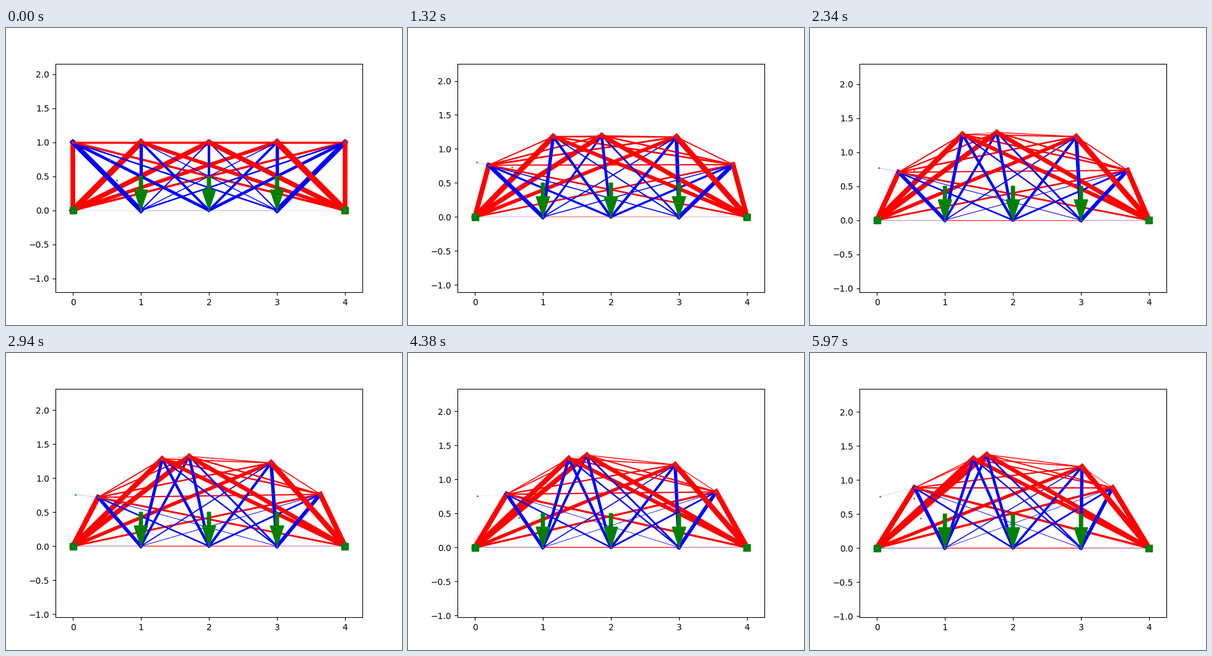
Animation of 640x480 px, one loop 6 s. Source, as a matplotlib script:

```python
from itertools import combinations

import matplotlib.pyplot as plt
import numpy as np
from matplotlib.animation import FuncAnimation
from matplotlib.patches import Rectangle

FRAMES, INTERVAL = 200, 30
LOAD = 10
SPAN = 4
HALF_H = 4.51 * 369.6 / 496 / 2

# Each upper joint starts at (x, 1) and glides through three waypoints
KEYS = np.array([0, 59, 98, FRAMES - 1])
WAYPOINTS = [
    [(.263, .714), (.372, .718), (.554, .884)],
    [(1.20, 1.227), (1.313, 1.282), (1.418, 1.315)],
    [(1.818, 1.248), (1.709, 1.32), (1.614, 1.373)],
    [(2.95, 1.214), (2.914, 1.225), (3.014, 1.193)],
    [(3.737, .727), (3.637, .762), (3.464, .884)],
]
PATHS = np.array([[(x, 1), *pts] for x, pts in enumerate(WAYPOINTS)])
SLOPES = np.gradient(PATHS, KEYS, axis=1)
LOOSE = [(.545, .73), (.645, .44)]

# Joints go column by column, bottom before top
JOINTS = 2 * (SPAN + 1)
BARS = list(combinations(range(JOINTS), 2))
FREE = [d for d in range(2 * JOINTS) if d // 2 not in (0, 2 * SPAN)]


def joints_at(t):
    """Bottom joints stay put, top joints follow a cubic Hermite curve."""
    i = min(np.searchsorted(KEYS, t, side="right"), len(KEYS) - 1) - 1
    h = KEYS[i + 1] - KEYS[i]
    s = (t - KEYS[i]) / h
    joints = np.zeros((JOINTS, 2))
    joints[::2, 0] = range(SPAN + 1)
    joints[1::2] = ((1 + 2 * s) * (1 - s) ** 2 * PATHS[:, i]
                    + s * (1 - s) ** 2 * h * SLOPES[:, i]
                    + s * s * (3 - 2 * s) * PATHS[:, i + 1]
                    + s * s * (s - 1) * h * SLOPES[:, i + 1])
    return joints


def bar_forces(joints):
    """Axial forces in a truss of equal springs under three loads."""
    rows = np.zeros((len(BARS), 2 * JOINTS))
    for row, (a, b) in zip(rows, BARS):
        d = joints[b] - joints[a]
        d = d / np.hypot(*d)
        row[2 * a:2 * a + 2] = -d
        row[2 * b:2 * b + 2] = d
    load = np.zeros(2 * JOINTS)
    load[5:4 * SPAN:4] = -LOAD
    rows = rows[:, FREE]
    return rows @ np.linalg.solve(rows.T @ rows, load[FREE])


def style(line, p, q, force):
    line.set_data([p[0], q[0]], [p[1], q[1]])
    line.set_linewidth(abs(force))
    line.set_color("blue" if force > 0 else "red")


fig, ax = plt.subplots(figsize=(6.4, 4.8), dpi=100)
lines = [ax.plot([], [], zorder=2)[0] for _ in BARS]
stray_line = ax.plot([], [], zorder=2)[0]
for x in (0, SPAN):
    ax.add_patch(Rectangle((x - .05, -.05), .1, .1, color="green", zorder=3))
for x in range(1, SPAN):
    ax.arrow(x, .5, 0, -.5, width=.05, head_width=.2, head_length=.3,
             length_includes_head=True, color="green", zorder=3)
dots = ax.scatter([], [], s=4, linewidths=0, color="C0", zorder=4)
ax.set_xlim(-.255, SPAN + .255)
ax.set_xticks(range(SPAN + 1))


def draw(t):
    joints = joints_at(t)
    for line, (a, b), force in zip(lines, BARS, bar_forces(joints)):
        style(line, joints[a], joints[b], force)

    # A loose joint sinks and hangs on the first top joint by a faint bar
    stray = .02 + .025 * t / FRAMES, .755 + .09 * np.exp(-(t / 55) ** 2)
    style(stray_line, stray, joints[1], .2 * np.sin(2 * np.pi * t / 320))
    dots.set_offsets(np.vstack([joints, [stray], LOOSE]))

    mid = (joints[:, 1].max() - .05) / 2
    ax.set_ylim(mid - HALF_H, mid + HALF_H)
    return [*lines, stray_line, dots]


anim = FuncAnimation(fig, draw, frames=FRAMES, interval=INTERVAL,
                     repeat=True, repeat_delay=0, blit=False)
plt.show()
```
